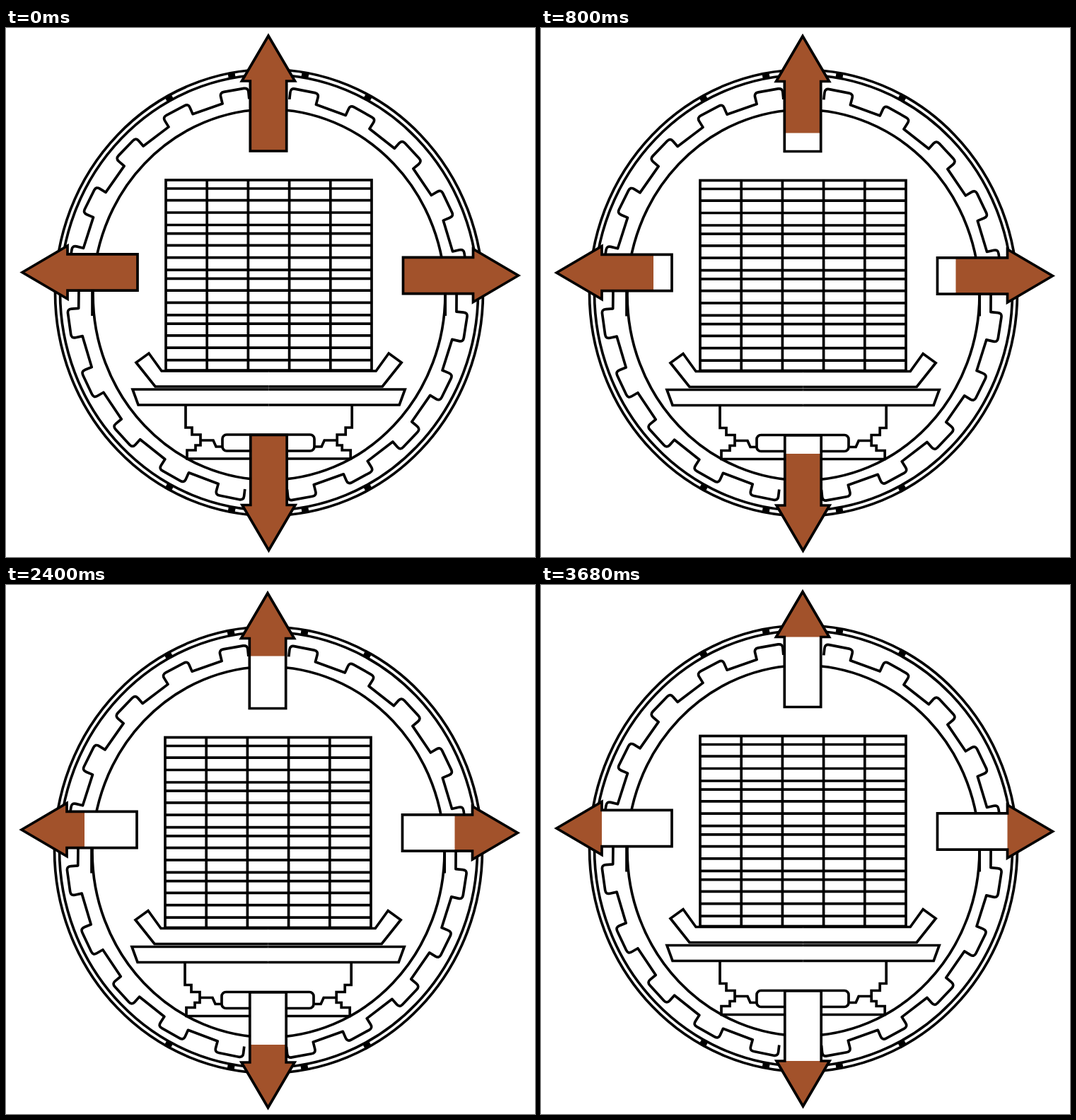
Write an HTML page that moves like this. It is 748 px wide and 748 px high and loops after 4000 ms.

```html
<!DOCTYPE html>
<html lang="en">
<head>
<meta charset="utf-8">
<title>Expansion arrows</title>
<style>
html, body { margin: 0; width: 100%; height: 100%; overflow: hidden; background: #fff; }
svg { display: block; width: 100vw; height: 100vh; }
</style>
</head>
<body>
<svg viewBox="0 0 748 748">
  <g id="scene" fill="none" stroke="#000" stroke-width="3.7" stroke-miterlimit="6"></g>
</svg>
<script>
const NS = 'http://www.w3.org/2000/svg';
const scene = document.getElementById('scene');
const AXIS = 371.6;

function add(tag, attrs, parent = scene) {
  const el = document.createElementNS(NS, tag);
  for (const key in attrs) el.setAttribute(key, attrs[key]);
  parent.appendChild(el);
  return el;
}
const path = (d, attrs = {}) => add('path', { d, ...attrs });
const ring = (cx, cy, rx, ry) => add('ellipse', { cx, cy, rx, ry });

// Draws a left half and its mirror image
function both(d) {
  path(d);
  path(d, { transform: `translate(${2 * AXIS} 0) scale(-1 1)` });
}

// Point on an ellipse, in degrees clockwise from the top
function onEllipse(cx, cy, rx, ry, deg) {
  const a = deg * Math.PI / 180;
  return [cx + rx * Math.sin(a), cy - ry * Math.cos(a)];
}

// Shell with bolts between its two rings
ring(372, 374, 302.5, 315.5);
ring(372, 374, 295.5, 308);
for (const a of [10, 28]) {
  for (const deg of [a, 180 - a, 180 + a, 360 - a]) {
    const [x, y] = onEllipse(371, 374.3, 299, 312, deg);
    add('rect', { x: x - 5, y: y - 4, width: 10, height: 8, fill: '#000', stroke: 'none',
      transform: `rotate(${deg} ${x} ${y})` });
  }
}

// Toothed lining: ten teeth a side, tilted slightly clockwise
const TEETH = 10, FIRST = 10.2, PITCH = 17.7, HALF_TOOTH = 4.1, DEPTH = 16, TILT = 0.5;

function toward(a, b, r) {
  const k = r / Math.hypot(b[0] - a[0], b[1] - a[1]);
  return [a[0] + (b[0] - a[0]) * k, a[1] + (b[1] - a[1]) * k];
}
function tooth(mid) {
  const at = (deg, out) => onEllipse(370, 376.5, 268 + out, 277.5 + out, deg);
  const a = at(mid - HALF_TOOTH, 0), b = at(mid - HALF_TOOTH, DEPTH);
  const c = at(mid + HALF_TOOTH, DEPTH), d = at(mid + HALF_TOOTH, 0);
  return `L${a}L${toward(b, a, 6)}Q${b} ${toward(b, c, 6)}` +
         `L${toward(c, b, 6)}Q${c} ${toward(c, d, 6)}L${d}`;
}
for (const side of [1, -1]) {
  let d = '';
  for (let i = 0; i < TEETH; i++) {
    const mid = FIRST + PITCH * (side > 0 ? i : TEETH - 1 - i);
    d += tooth(side * mid + TILT);
  }
  path('M' + d.slice(1), { 'stroke-linejoin': 'round' });
}

// Inner bore
ring(372, 377, 249, 262);
both('M122 372V407');

// Stack: five columns, rows repeating in groups of four
const [LEFT, TOP, WIDE, HIGH] = [226, 215, 291, 269];
add('rect', { x: LEFT, y: TOP, width: WIDE, height: HIGH });
for (let i = 1; i < 5; i++) path(`M${LEFT + i * WIDE / 5} ${TOP}v${HIGH}`);
for (let i = 0; i < 4; i++) {
  for (const gap of [0, 16.7, 34, 51.5]) path(`M${LEFT} ${TOP + 12 + i * 63.7 + gap}h${WIDE}`);
}

// Cradle, platform and base
both(`M${AXIS} 485H220L202 460L184 473L211 507H${AXIS}`);
both(`M${AXIS} 511H179L187 533H${AXIS}`);
both(`M254 533V565H263V575H275V590H268V597H256V609H${AXIS}`);
both('M275 583H293L297 592H306');
add('rect', { x: 306, y: 575, width: 130, height: 23, rx: 6, fill: '#fff' });

// Arrows, drawn pointing up with the tip at the origin
const HEAD = 64, HALF = 37.5, SHAFT = 25.7, LENGTH = 163;
function arrow(length) {
  const shaft = length > HEAD ? `H${SHAFT}V${length}H${-SHAFT}V${HEAD}` : '';
  return `M0 0L${HALF} ${HEAD}${shaft}H${-HALF}Z`;
}
const tips = [[371, 11], [724.5, 350], [371.5, 738.5], [23, 345.5]];
const fills = tips.map(([x, y], i) => {
  const g = add('g', { transform: `translate(${x} ${y}) rotate(${i * 90})` });
  add('path', { d: arrow(LENGTH), fill: '#fff', stroke: 'none' }, g);
  const fill = add('path', { fill: '#a2522b', stroke: 'none' }, g);
  add('path', { d: arrow(LENGTH) }, g);
  return fill;
});

// Each step: filled length from the tip, and the drawing's small shift
const STEP = 800;
const steps = [[LENGTH, 0, 0], [137, -1, 0.5], [115.5, -2, 0.5], [89, -1, 0.5], [HEAD, -1, -1.5]];

function draw(time) {
  const [level, dx, dy] = steps[Math.floor(time / STEP) % steps.length];
  scene.setAttribute('transform', `translate(${dx} ${dy})`);
  for (const fill of fills) fill.setAttribute('d', arrow(level));
}

const began = performance.now();
function tick() {
  draw(performance.now() - began);
  requestAnimationFrame(tick);
}
tick();
</script>
</body>
</html>
```
